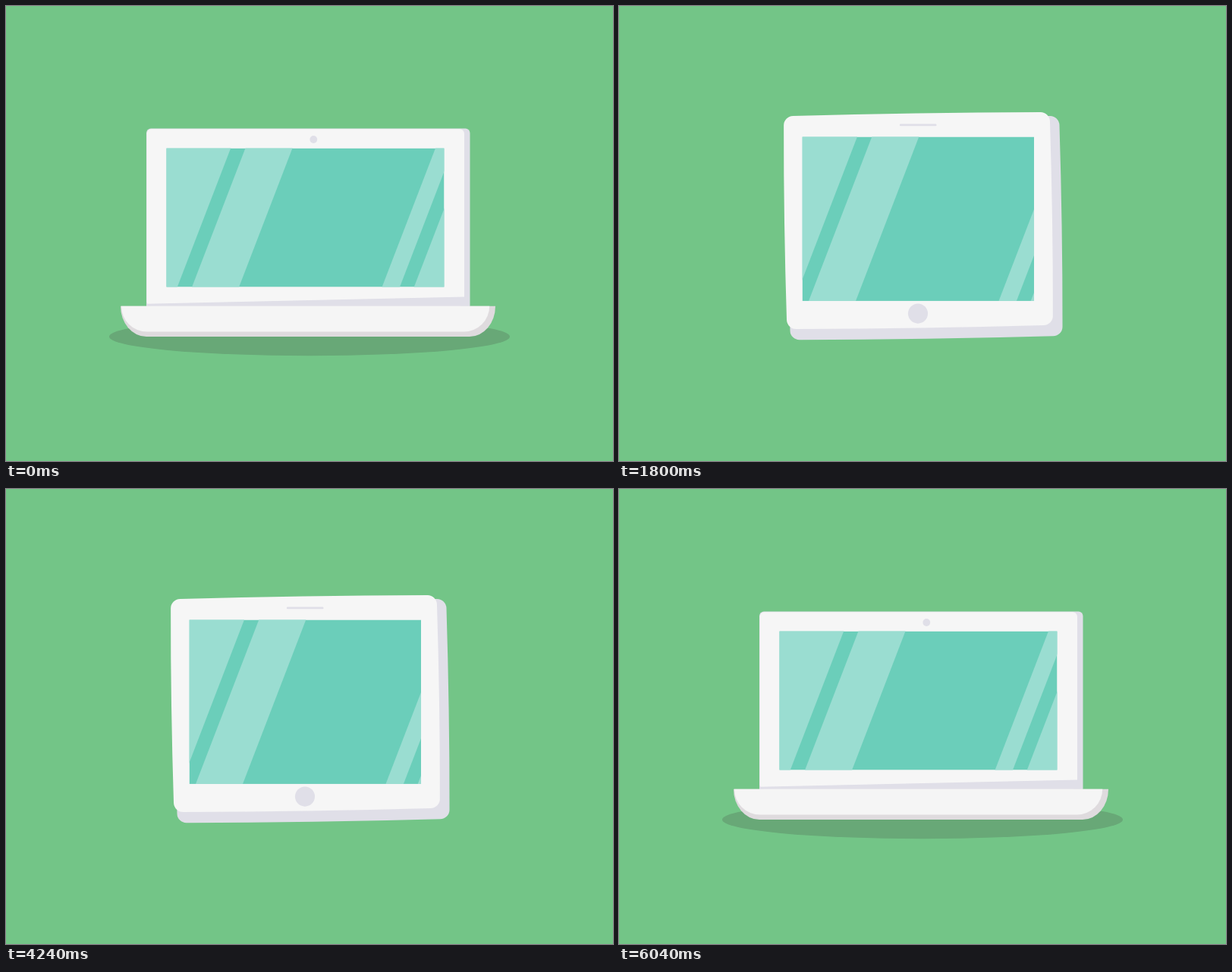
Write an HTML page with a canvas that moves like this. It is 800 by 600 pixels and loops after 6080 ms.

```html
<!DOCTYPE html>
<html lang="en">
<head>
<meta charset="utf-8">
<title>Responsive devices</title>
<style>
  html, body { margin: 0; width: 100%; height: 100%; overflow: hidden; background: #73c587; }
  canvas { display: block; }
</style>
</head>
<body>
<canvas id="stage" width="800" height="600"></canvas>
<script>
const ctx = document.getElementById('stage').getContext('2d');
const LOOP = 6080, STEP = 40, TURN = 3020;
const GREEN = '#73c587', WHITE = '#f6f6f6', GREY = '#e0dfe8', TEAL = '#6bceba', SHINE = '#9addd1';
const BASE_TOP = 395.8;

// Boxes: left, top, right, bottom
const LAPTOP = {
  face: [185.5, 162.3, 604, 395.5],
  back: [185, 161.5, 611.5, 401],
  screen: [211.4, 187.6, 577.5, 370.6]
};
const PHONE = {
  face: [282, 100, 506, 482],
  back: [285.5, 102, 518, 498.7],
  screen: [301, 142.8, 487, 425]
};

const mix = (a, b, k) => a + (b - a) * k;
const unit = (t, from, to) => Math.min(1, Math.max(0, (t - from) / (to - from)));
const smooth = u => u * u * (3 - 2 * u);
const easeOut = (u, power) => 1 - (1 - u) ** power;
const morph = (part, p) => LAPTOP[part].map((v, i) => mix(v, PHONE[part][i], p));

function fillPath(color, draw) {
  ctx.fillStyle = color;
  ctx.beginPath();
  draw();
  ctx.fill();
}

function placed(x, y, draw) {
  ctx.save();
  ctx.translate(x, y);
  draw();
  ctx.restore();
}

function circle(x, y, r, color) {
  fillPath(color, () => ctx.arc(x, y, r, 0, Math.PI * 2));
}

// A rounded box that tilts and bulges midway through the morph.
function drawShell(part, p, color, shiftX, shiftY) {
  const [left, top, right, bottom] = morph(part, p);
  const warp = 4 * p * (1 - p);
  const bend = 1.2 * warp, radius = mix(6, 25, p);
  let w = (right - left) / 2 - bend;
  let h = (bottom - top) / 2 - bend;
  placed((left + right) / 2 + shiftX * warp, (top + bottom) / 2 + shiftY * warp, () => {
    ctx.rotate(-0.017 * warp);
    fillPath(color, () => {
      ctx.moveTo(radius - w, -h);
      for (let side = 0; side < 4; side++) {
        ctx.quadraticCurveTo(0, -h - 2 * bend, w - radius, -h);
        ctx.arcTo(w, -h, w, radius - h, radius);
        ctx.rotate(Math.PI / 2);
        [w, h] = [h, w];
      }
    });
  });
}

function drawScreen(p, shift) {
  const [left, top, right, bottom] = morph('screen', p);
  ctx.save();
  ctx.beginPath();
  ctx.rect(left, top, right - left, bottom - top);
  ctx.clip();
  ctx.fillStyle = TEAL;
  ctx.fillRect(left, top, right - left, bottom - top);
  // Slanted bands, given by their edges at y = 188
  ctx.transform(1, 0, -0.3846, 1, shift + 188 * 0.3846, 0);
  ctx.fillStyle = SHINE;
  for (const [x0, x1] of [[0, 296], [315.3, 377.3], [565.8, 589.2], [608, 800]]) {
    ctx.fillRect(x0, 0, x1 - x0, 600);
  }
  ctx.restore();
}

function drawSpeaker(y, half) {
  if (half <= 0) return;
  ctx.strokeStyle = GREY;
  ctx.lineWidth = 2.7;
  ctx.lineCap = 'round';
  ctx.beginPath();
  ctx.moveTo(394.2 - half, y);
  ctx.lineTo(394.2 + half, y);
  ctx.stroke();
}

// Shade that the base throws on the foot of the lid
function drawFootShade(s) {
  fillPath(GREY, () => {
    ctx.moveTo(185, BASE_TOP);
    ctx.lineTo(185, BASE_TOP - 3 * s);
    ctx.lineTo(604, BASE_TOP - 12.3 * s);
    ctx.lineTo(604, BASE_TOP);
  });
}

function drawTray(left, right, bottom, color) {
  const h = bottom - BASE_TOP;
  const corner = { x: 34, y: h };
  fillPath(color, () => ctx.roundRect(left, BASE_TOP, right - left, h, [0, 0, corner, corner]));
}

function drawBase(s) {
  placed(398, 416, () => {
    ctx.scale(s, s);
    ctx.translate(-398, -416);
    drawTray(151, 645, 436, '#dfdbde');
    drawTray(152, 637.2, 429.5, '#f5f5f5');
  });
}

// The base swells a little before it collapses.
function baseScale(t) {
  return t < 1330
    ? 1 + 0.045 * smooth(unit(t, 1060, 1330))
    : 1.045 * (1 - unit(t, 1330, 1700) ** 2);
}

function render(time) {
  const t = time > TURN ? LOOP - STEP - time : time;
  const p = smooth(unit(t, 1698, 1960));
  const s = baseScale(t);
  const grow = unit(t, 1600, 2080);

  ctx.fillStyle = GREEN;
  ctx.fillRect(0, 0, 800, 600);
  fillPath('#68a877', () => ctx.ellipse(400, 436, 264 * s, 25.3 * s, 0, 0, Math.PI * 2));

  drawShell('back', p, GREY, 4, 5.6);
  drawShell('face', p, WHITE, 0, 0);
  if (s > 0) drawFootShade(s);
  circle(405.3, 176, 4.9 * (1 - smooth(unit(t, 1400, 1600))), GREY);
  drawSpeaker(mix(173.9, 123.5, p), 26 * easeOut(grow, 4));
  drawScreen(p, t / 150);
  circle(394, mix(383.4, 449.3, p), 14 * easeOut(grow, 5), GREY);
  if (s > 0) drawBase(s);
}

function tick() {
  const now = performance.now() % LOOP;
  render(Math.floor(now / STEP) * STEP);
  requestAnimationFrame(tick);
}
tick();
</script>
</body>
</html>
```
